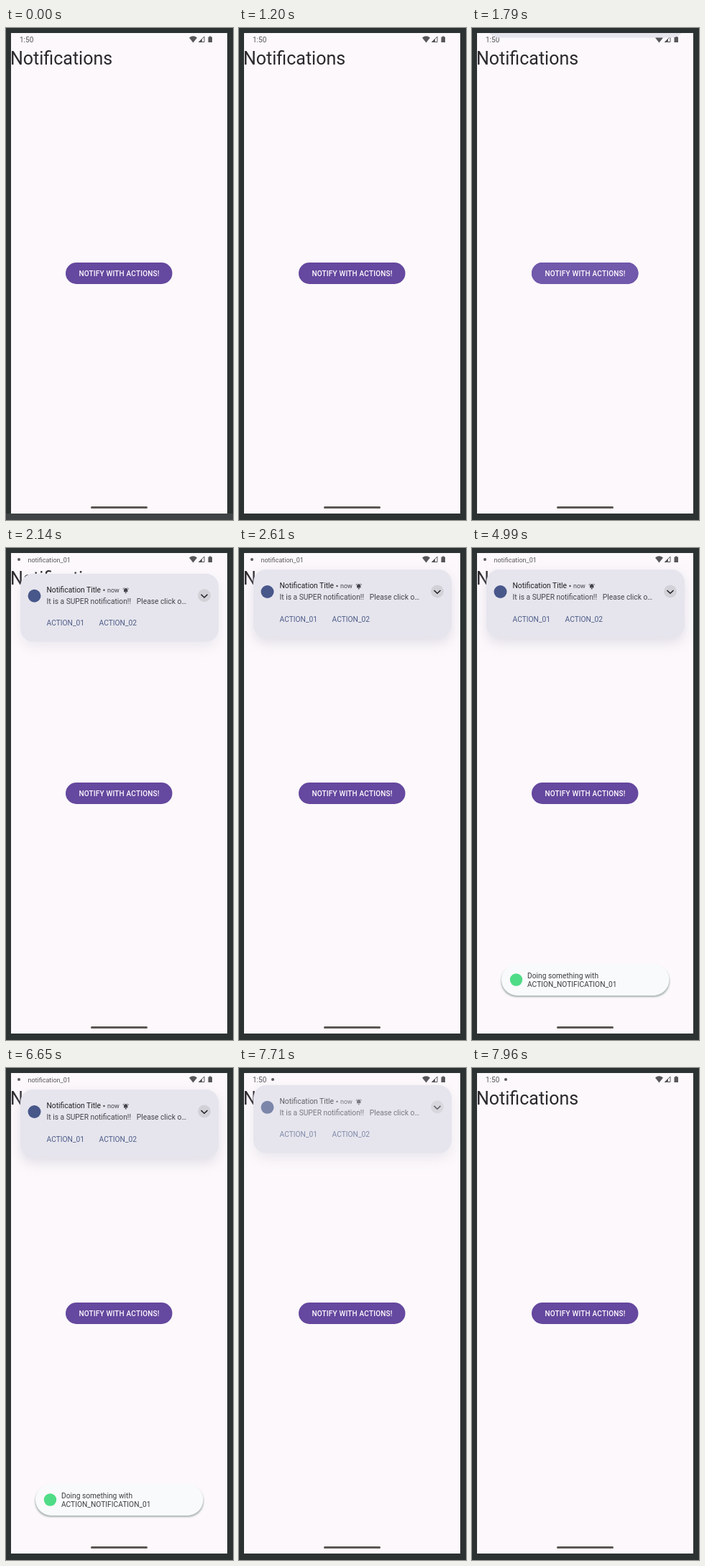
Animation, 316 px wide and 686 px high, one loop 8000 ms. Source, as an HTML page:

```html
<!DOCTYPE html>
<html lang="en">
<head>
<meta charset="utf-8">
<title>Notification with actions</title>
<style>
  html, body { margin: 0; width: 100%; height: 100%; overflow: hidden; background: #2c3232; }
  svg { display: block; width: 316px; height: 686px; }
  text { font: 10px Roboto, sans-serif; white-space: pre; }
  .status { fill: #58575b; }
  .title { font-size: 10.3px; fill: #1f1e23; }
  .body { font-size: 10.25px; fill: #45444b; }
  .action { font-size: 10.25px; fill: #4d5c88; }
  .toast { font-size: 10.25px; fill: #3c3d40; }
</style>
</head>
<body>
<svg viewBox="0 0 316 686">
  <defs>
    <clipPath id="screenClip"><rect x="7" y="7" width="301" height="670"/></clipPath>
    <clipPath id="buttonClip"><rect x="83" y="327" width="148.500" height="30" rx="15"/></clipPath>
    <filter id="halo" x="-20%" y="-40%" width="140%" height="180%"><feGaussianBlur stdDeviation="8"/></filter>
    <filter id="soft" x="-5%" y="-20%" width="110%" height="140%"><feGaussianBlur stdDeviation="1.2"/></filter>
  </defs>

  <rect width="316" height="686" fill="#2c3232"/>
  <rect id="bottomEdge" y="677" width="316" height="9" fill="#3f4346"/>
  <rect x="7" y="7" width="301" height="670" fill="#fcf8fb"/>

  <g clip-path="url(#screenClip)">
    <text x="6" y="51" style="font-size:25px" fill="#2a282d">Notifications</text>

    <g clip-path="url(#buttonClip)">
      <rect x="83" y="327" width="149" height="30" fill="#65489f"/>
      <circle id="buttonRipple" cx="157" cy="342" fill="#7159ab"/>
    </g>
    <text x="157.600" y="346" text-anchor="middle" font-weight="500" style="font-weight:500" fill="#fdfafd" letter-spacing=".2">NOTIFY WITH ACTIONS!</text>
    <rect x="118" y="667" width="79" height="3" rx="1.500" fill="#5b5855"/>

    <g class="status">
      <g id="clock">
        <text x="19" y="19.500">1:50</text>
        <circle id="clockDot" cx="47" cy="16" r="2"/>
      </g>
      <g id="ticker">
        <circle cx="18" cy="16" r="2"/>
        <text x="30.500" y="19.500" style="font-size:9px">notification_01</text>
      </g>
      <path d="M255 13.500Q260.500 9 266 13.500L260.500 20.500Z"/>
      <path d="M268.500 19.500H276V12Z" fill="none" stroke="#58575b"/>
      <path d="M268 20H273V15Z"/>
      <path d="M281.500 12.500H283V11.500H285.500V12.500H287V20H281.500Z"/>
    </g>

    <g id="card">
      <rect id="cardHalo" x="20" y="36" width="276" height="97" rx="18" fill="#c9c8d6" filter="url(#halo)"/>
      <rect x="20" y="30" width="276" height="95" rx="18" fill="#e6e5ed"/>
      <g id="cardContent">
        <circle cx="39.500" cy="61" r="9" fill="#48578a"/>
        <text class="title" x="56.500" y="56">Notification Title</text>
        <circle cx="136.500" cy="53" r="1.200" fill="#45444b"/>
        <text x="141" y="56" style="font-size:9px" fill="#45444b">now</text>
        <g fill="#45444b">
          <path d="M164 55.500V53Q164 50.500 166.700 50Q169.400 50.500 169.400 53V55.500Z"/>
          <circle cx="166.700" cy="56.700" r=".9"/>
          <path d="M163 52Q163 50.500 164.500 49.500M170.400 52Q170.400 50.500 168.900 49.500" fill="none" stroke="#45444b" stroke-width=".8"/>
        </g>
        <text class="body" x="56.500" y="72">It is a SUPER notification!!   Please click o…</text>
        <circle cx="276" cy="60.500" r="9" fill="#d3d1d8"/>
        <path d="M271.500 59L276 63.300L280.500 59" fill="none" stroke="#1f1e23" stroke-width="1.500"/>
        <circle id="touch" cx="94" cy="94" r="8.500" fill="#66656e"/>
        <rect id="actionRipple" x="52" y="85" width="62" height="26" rx="4" fill="#4d5c88"/>
        <text class="action" x="56.500" y="102.500">ACTION_01</text>
        <text class="action" x="129.500" y="102.500">ACTION_02</text>
      </g>
    </g>

    <g id="toast">
      <rect x="40.500" y="582.500" width="234.500" height="43.500" rx="21.500" fill="#a9b3b3" filter="url(#soft)"/>
      <rect x="41" y="580" width="233.500" height="44" rx="22" fill="#f9fafb"/>
      <circle cx="61.500" cy="602" r="8.700" fill="#4fdc86"/>
      <text class="toast" x="77" y="600">Doing something with</text>
      <text class="toast" x="77" y="612">ACTION_NOTIFICATION_01</text>
    </g>
  </g>
</svg>
<script>
  const LOOP = 8000;
  const CARD_TRAVEL = 120;
  const el = id => document.getElementById(id);
  const progress = (t, from, to) => Math.min(1, Math.max(0, (t - from) / (to - from)));
  const easeOut = p => 1 - (1 - p) ** 3;
  const smooth = p => p * p * (3 - 2 * p);
  const fade = (id, opacity) => el(id).setAttribute('opacity', opacity);
  const show = (id, visible) => el(id).setAttribute('visibility', visible ? 'visible' : 'hidden');

  // Rises past 1, dips just below it, then settles.
  const bounce = p =>
    1.125 * Math.sin(progress(p, 0, 0.5) * Math.PI / 2)
    - 0.145 * smooth(progress(p, 0.5, 0.8))
    + 0.02 * smooth(progress(p, 0.8, 1));

  function drawButton(t) {
    el('buttonRipple').setAttribute('r', 80 * easeOut(progress(t, 1450, 1720)));
    fade('buttonRipple', 1 - progress(t, 1800, 2050));
  }

  function drawStatus(t) {
    fade('clock', 1 - progress(t, 1840, 1950) + progress(t, 7610, 7700));
    fade('ticker', progress(t, 1940, 2050) - progress(t, 7550, 7610));
    show('clockDot', t >= 7600);
  }

  function drawCard(t) {
    const enter = bounce(progress(t, 1780, 2330));
    const leave = smooth(progress(t, 7610, 7960) ** 1.6);
    const dim = progress(t, 7550, 7960);
    show('card', t >= 1780 && t < 7960);
    el('card').setAttribute('transform', `translate(0 ${CARD_TRAVEL * (enter - 1 - leave)})`);
    fade('cardHalo', 0.5 * progress(t, 1900, 2310) * (1 - 0.9 * dim));
    fade('cardContent', progress(t, 1800, 2050) * (1 - 0.85 * dim));

    const released = progress(t, 4530, 4800);
    fade('touch', t < 4340 ? 0 : 0.25 * (1 - released));
    fade('actionRipple', t < 4530 ? 0 : 0.12 * (1 - released));
  }

  function drawToast(t) {
    const enter = 1 - (1 - progress(t, 4750, 5090)) ** 5;
    const leave = progress(t, 6650, 6900) ** 2;
    const scale = 0.9 + 0.1 * (enter - leave);
    el('toast').setAttribute('transform',
      `translate(157.500 602) scale(${scale}) translate(-157.500 -602)`);
    fade('toast', progress(t, 4750, 4835) - progress(t, 6790, 6890));
  }

  function frame(now) {
    const t = now % LOOP;
    show('bottomEdge', t < 1200);
    drawButton(t);
    drawStatus(t);
    drawCard(t);
    drawToast(t);
    requestAnimationFrame(frame);
  }
  frame(performance.now());
</script>
</body>
</html>
```
